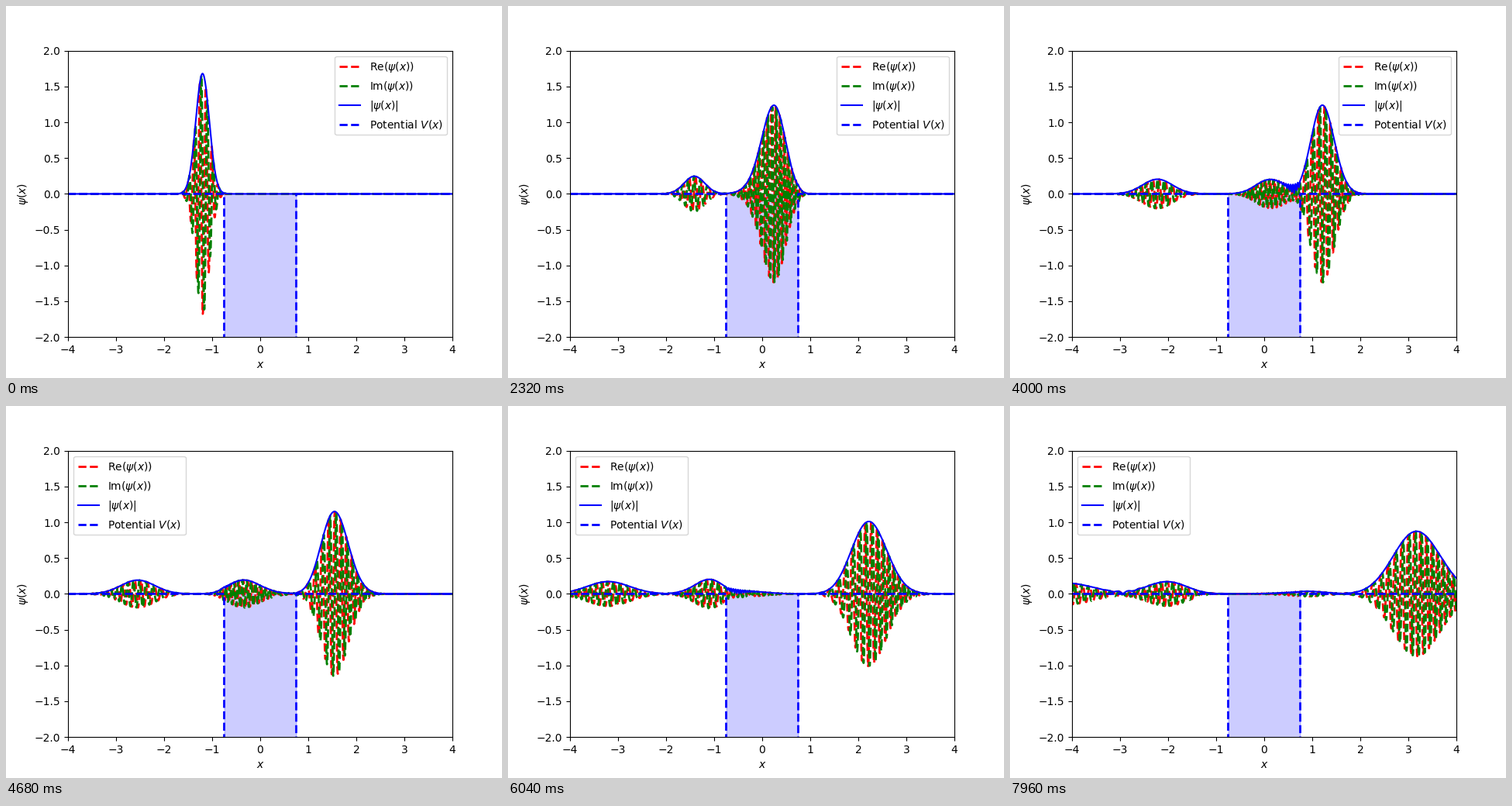
Write a matplotlib script that moves like this. It is 640 px wide and 480 px high and loops after 8000 ms.

```python
import numpy as np
import matplotlib.pyplot as plt
from matplotlib.animation import FuncAnimation

FRAMES, INTERVAL = 200, 40
DX, HALF = 0.005, 8.0          # grid step and half width of the box
DT, SUBSTEPS = 4e-4, 40        # time per frame, steps within it
K0, X0, SIGMA = 50.0, -1.2, 0.2
DEPTH, EDGE = 1250.0, 0.75     # square well

n = int(round(2 * HALF / DX))
x = (np.arange(n) - n // 2) * DX
V = np.where(np.abs(x) < EDGE - DX / 10, -DEPTH, 0.0)


def evolve():
    """Split-step solution of the Schroedinger equation on the lattice."""
    h = DT / SUBSTEPS
    k = 2 * np.pi * np.fft.fftfreq(n, DX)
    kinetic = np.exp(-1j * h * (1 - np.cos(k * DX)) / DX**2)
    half = np.exp(-0.5j * h * V)
    full = half * half
    psi = np.exp(-((x - X0) / SIGMA) ** 2 + 1j * K0 * x)
    psi /= np.sqrt(SIGMA * np.sqrt(np.pi))
    states = [psi]
    for _ in range(FRAMES - 1):
        psi = psi * half
        for _ in range(SUBSTEPS):
            psi = np.fft.ifft(kinetic * np.fft.fft(psi)) * full
        psi = psi / half
        states.append(psi)
    return np.array(states)


shown = np.abs(x) < 4 + 2.5 * DX
waves = evolve()[:, shown]
x, V = x[shown], V[shown]

fig, ax = plt.subplots(figsize=(6.4, 4.8), dpi=100)
ax.set_xlim(-4, 4)
ax.set_ylim(-2, 2)
ax.set_xlabel("$x$")
ax.set_ylabel(r"$\psi(x)$")

re_line, = ax.plot(x, waves[0].real, "r--", lw=2, label=r"Re$(\psi(x))$")
im_line, = ax.plot(x, waves[0].imag, "g--", lw=2, label=r"Im$(\psi(x))$")
abs_line, = ax.plot(x, np.abs(waves[0]), "b", lw=1.5, label=r"$|\psi(x)|$")
ax.plot(x, V, "b--", lw=2, label="Potential $V(x)$")
ax.fill_between(x, 0, np.maximum(V, -3), color="b", alpha=0.2)
ax.legend(loc="best")          # moves aside when the packet reaches it


def update(i):
    psi = waves[i]
    re_line.set_ydata(psi.real)
    im_line.set_ydata(psi.imag)
    abs_line.set_ydata(np.abs(psi))
    return re_line, im_line, abs_line


anim = FuncAnimation(fig, update, frames=FRAMES, interval=INTERVAL,
                     repeat=True, repeat_delay=0)
plt.show()
```
